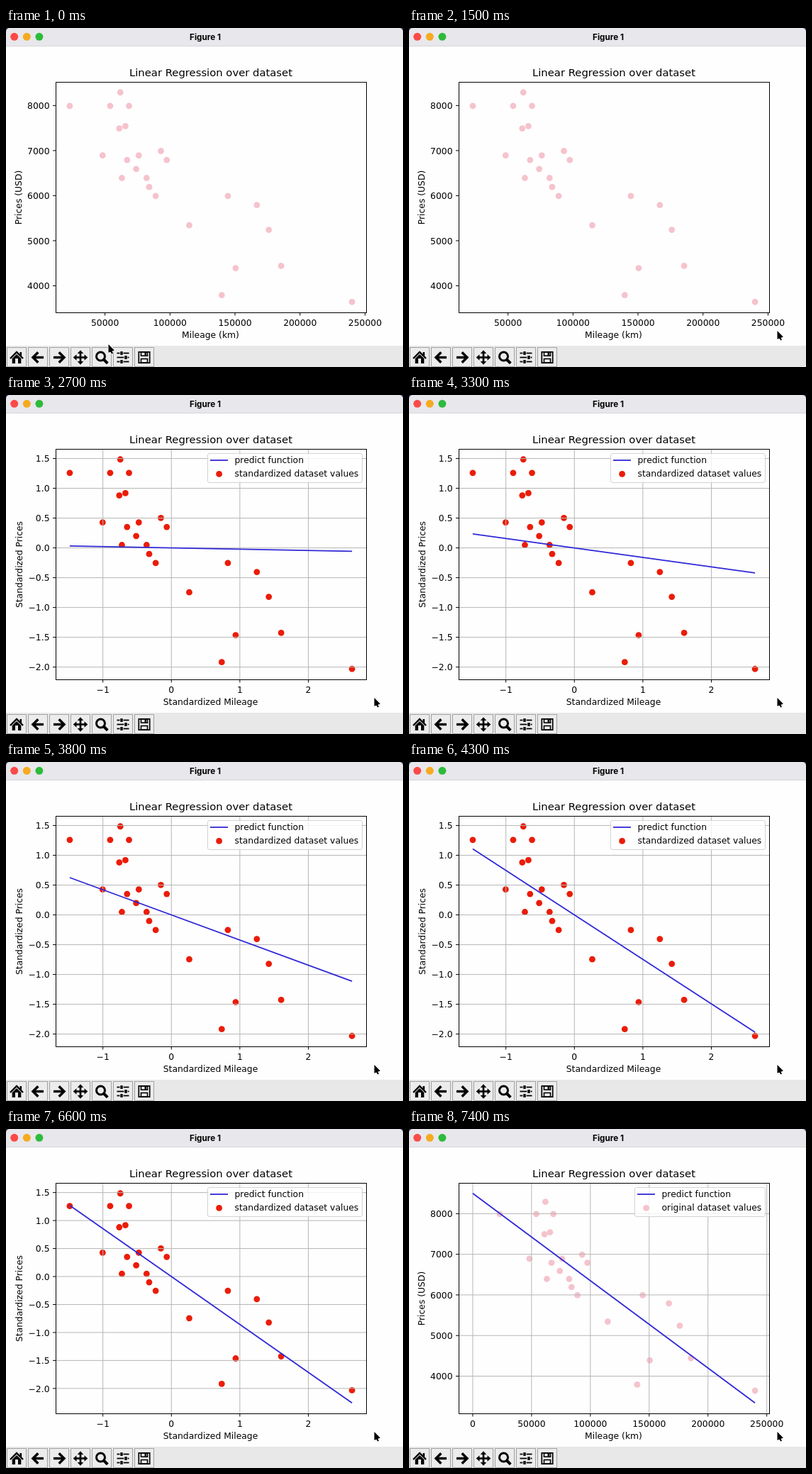
An HTML page with a canvas that plays this animation: 560 px wide and 478 px high, repeating every 7.5 s.

```html
<!DOCTYPE html>
<html lang="en">
<head>
<meta charset="utf-8">
<title>Figure 1</title>
<style>
  html, body { margin: 0; width: 100%; height: 100%; overflow: hidden; background: #fefefe; }
  canvas { display: block; }
</style>
</head>
<body>
<canvas id="stage" width="560" height="478"></canvas>
<script>
const ctx = document.getElementById('stage').getContext('2d');
const LOOP = 7500, FIT_START = 2500, RESULT_START = 7000;
const BOX = { x: 70, y: 76, w: 438, h: 325 };
const PINK = '#f5c3cd', RED = '#ea1c08', BLUE = '#3028d6', GRID = '#b6b6b6';
const QUARTER = Math.PI / 2;

// The plotted data: mileages (thousand km) of the cars sold at each price (thousand USD)
const sales = {
  3.65: [240], 3.8: [139.8], 4.4: [150.5], 4.45: [185.5], 5.25: [176], 5.35: [114.8],
  5.8: [166.8], 6: [89, 144.5], 6.2: [84], 6.4: [82, 63], 6.6: [74], 6.8: [97.5, 67],
  6.9: [76, 48.2], 7: [93], 7.5: [61], 7.55: [65.7], 8: [54, 68.5, 22.9], 8.3: [61.8]
};
const cars = Object.entries(sales).flatMap(([price, list]) => list.map(d => [d * 1000, price * 1000 - 8]));

function stats(i) {
  const mean = cars.reduce((s, c) => s + c[i], 0) / cars.length;
  const sum = cars.reduce((s, c) => s + (c[i] - mean) ** 2, 0);
  return { mean, sd: Math.sqrt(sum / (cars.length - 1)) };
}
const km = stats(0), usd = stats(1);
const scaled = cars.map(c => [(c[0] - km.mean) / km.sd, (c[1] - usd.mean) / usd.sd]);
const fit = scaled.reduce((s, p) => s + p[0] * p[1], 0) / (cars.length - 1);

// Gradient descent whose learning rate grows with every iteration
function slopeAt(t) {
  const work = 0.0442 * (Math.exp(2.13 * (t / 1000 - 2.488)) - 1);
  return fit * (1 - Math.exp(-Math.max(0, work)));
}

function text(str, x, y, align = 'center', font = '12.35px "DejaVu Sans"') {
  ctx.font = font + ', sans-serif';
  ctx.textAlign = align;
  ctx.fillStyle = '#000';
  ctx.fillText(str, x, y);
}

function trace(points) {
  ctx.beginPath();
  points.forEach(p => ctx.lineTo(p[0], p[1]));
}

function path(points, width, color = '#000') {
  trace(points);
  ctx.lineWidth = width;
  ctx.strokeStyle = color;
  ctx.stroke();
}

function shape(points) {
  trace(points);
  ctx.fillStyle = '#000';
  ctx.fill();
}

function dot(x, y, r, color) {
  ctx.beginPath();
  ctx.arc(x, y, r, 0, 7);
  ctx.fillStyle = color;
  ctx.fill();
}

function rect(x, y, w, h, color = '#000') {
  ctx.fillStyle = color;
  ctx.fillRect(x, y, w, h);
}

function outline(x, y, w, h, width = 1, color = '#000') {
  ctx.lineWidth = width;
  ctx.strokeStyle = color;
  ctx.strokeRect(x, y, w, h);
}

// Axis with 5% margins around its values
function axis(values, start, length) {
  const lo = Math.min(...values), hi = Math.max(...values), pad = (hi - lo) / 20;
  const at = v => start + length * (v - lo + pad) / (hi - lo + 2 * pad);
  const ticks = step => {
    const list = [];
    for (let n = Math.ceil((lo - pad) / step); n * step <= hi + pad; n++) list.push(n * step);
    return list;
  };
  return { at, ticks };
}

const label = (v, digits) => v.toFixed(digits).replace('-', '\u2212');

function chart({ points, line, color, steps, digits = 0, names, nameX, legend }) {
  const all = line ? points.concat(line) : points;
  const right = BOX.x + BOX.w, bottom = BOX.y + BOX.h;
  const X = axis(all.map(p => p[0]), BOX.x, BOX.w);
  const Y = axis(all.map(p => p[1]), bottom, -BOX.h);

  points.forEach(p => dot(X.at(p[0]), Y.at(p[1]), 4.4, color));
  for (const v of X.ticks(steps[0])) {
    const x = X.at(v);
    if (line) path([[x, BOX.y], [x, bottom]], 1, GRID);
    path([[x, bottom], [x, bottom + 4.5]], 1);
    text(label(v, 0), x, 419.6);
  }
  for (const v of Y.ticks(steps[1])) {
    const y = Y.at(v);
    if (line) path([[BOX.x, y], [right, y]], 1, GRID);
    path([[BOX.x - 4, y], [BOX.x, y]], 1);
    text(label(v, digits), 61.5, y + 4.7, 'right');
  }
  if (line) path(line.map(p => [X.at(p[0]), Y.at(p[1])]), 1.8, BLUE);
  outline(BOX.x + 0.5, BOX.y + 0.5, BOX.w, BOX.h);

  text('Linear Regression over dataset', 289, 67.8, 'center', '14.8px "DejaVu Sans"');
  text(names[0], 288.5, 436.5);
  ctx.save();
  ctx.translate(nameX, 239);
  ctx.rotate(-QUARTER);
  text(names[1], 0, 4.5);
  ctx.restore();
  if (legend) drawLegend(legend.x, legend.name, color);
}

function drawLegend(x, name, color) {
  ctx.beginPath();
  ctx.roundRect(x + 0.5, 82.5, 502 - x, 41, 2.5);
  ctx.fillStyle = 'rgba(255,255,255,.8)';
  ctx.fill();
  ctx.lineWidth = 1;
  ctx.strokeStyle = '#d3d3d3';
  ctx.stroke();
  path([[x + 4, 92], [x + 29, 92]], 1.8, BLUE);
  dot(x + 16.6, 111.4, 4.4, color);
  text('predict function', x + 38.5, 96, 'left');
  text(name, x + 38.5, 115, 'left');
}

const chevron = (size, width) => path([[-size, size], [0, 0], [size, size]], width);

function arrow(turns) {
  ctx.rotate(turns * QUARTER);
  ctx.translate(0, -7);
  chevron(7.3, 3.5);
  path([[0, 1], [0, 15]], 3.4);
}

// Toolbar icons, each around its own centre
const icons = [
  function home() {
    ctx.translate(0, -7.5);
    chevron(9, 2.4);
    rect(4.5, 0, 2.6, 6);
    shape([[-6.3, 9], [0, 3], [6.3, 9]]);
    rect(-6.3, 9, 4.3, 7);
    rect(2, 9, 4.3, 7);
  },
  () => arrow(-1),
  () => arrow(1),
  function move() {
    for (let i = 0; i < 4; i++) {
      path([[0, 0], [0, -7]], 2.7);
      shape([[0, -10.3], [4.3, -5.5], [-4.3, -5.5]]);
      ctx.rotate(QUARTER);
    }
  },
  function zoom() {
    ctx.beginPath();
    ctx.arc(-1.5, -1.5, 6, 0, 7);
    ctx.lineWidth = 3;
    ctx.stroke();
    path([[3, 3], [8.3, 8.3]], 4);
  },
  function sliders() {
    for (let i = -1; i <= 1; i++) {
      const x = 4 - 6 * Math.abs(i), y = 6 * i;
      path([[-8.5, y], [8.5, y]], 1.8);
      rect(x - 2.6, y - 2.8, 5.2, 5.6, '#ececec');
      rect(x - 1.7, y - 2.4, 3.4, 4.8);
    }
  },
  function save() {
    outline(-7.7, -7.7, 15.4, 15.4, 1.7);
    outline(-4.5, -7.7, 9, 5.4, 1.6);
    outline(-4.5, 2, 9, 5.7, 1.6);
    rect(0.5, -7, 2.5, 4);
  }
];

function frame() {
  rect(0, 0, 560, 478, '#fefefe');
  rect(0, 0, 560, 10, '#2b2f50');
  ctx.beginPath();
  ctx.roundRect(0, 0, 560, 26, [5, 5, 0, 0]);
  ctx.fillStyle = '#e8e7ec';
  ctx.fill();
  rect(0, 25, 560, 1, '#d6d5d9');
  ['#fb4a47', '#f5ab20', '#2dbb3b'].forEach((c, i) => dot(11.7 + 17.6 * i, 12.3, 5.5, c));
  text('Figure 1', 281, 16.5, 'center', '700 11.7px Inter');

  rect(0, 448, 560, 30, '#e8e8e8');
  icons.forEach((icon, i) => {
    rect(30 * i + 1, 450, 28, 27, '#ececec');
    outline(30 * i + 1.5, 450.5, 27, 27, 1, '#a2a2a2');
    ctx.save();
    ctx.translate(30 * i + 15, 464.5);
    ctx.strokeStyle = '#000';
    icon();
    ctx.restore();
  });
}

function cursor(t) {
  const u = Math.min(1, Math.max(0, (t - 100) / 900));
  const s = u * u * (3 - 2 * u);
  ctx.save();
  ctx.translate(144.5 + 375 * s, 446 - 19 * s);
  const head = [[0, 0], [0, 11.8], [8.4, 8.4], [0, 0]], tail = [[2, 7], [5.6, 13]];
  path(head, 1.8, '#fff');
  path(tail, 4, '#fff');
  shape(head);
  path(tail, 2.2);
  ctx.restore();
}

function plot(t) {
  const raw = { points: cars, color: PINK, steps: [50000, 1000], names: ['Mileage (km)', 'Prices (USD)'], nameX: 17.5 };
  if (t < FIT_START) return chart(raw);
  if (t < RESULT_START) {
    const k = slopeAt(t), xs = scaled.map(p => p[0]);
    return chart({
      points: scaled, color: RED, steps: [1, 0.5], digits: 1, nameX: 18.5,
      line: [Math.min(...xs), Math.max(...xs)].map(x => [x, k * x]),
      names: ['Standardized Mileage', 'Standardized Prices'],
      legend: { x: 284, name: 'standardized dataset values' }
    });
  }
  const price = x => usd.mean + fit * usd.sd * (x - km.mean) / km.sd;
  chart({
    ...raw, line: [0, 240000].map(x => [x, price(x)]),
    legend: { x: 318, name: 'original dataset values' }
  });
}

const begin = performance.now();
function tick() {
  const t = Math.floor((performance.now() - begin) % LOOP / 100) * 100;
  frame();
  plot(t);
  cursor(t);
  requestAnimationFrame(tick);
}
tick();
</script>
</body>
</html>
```
